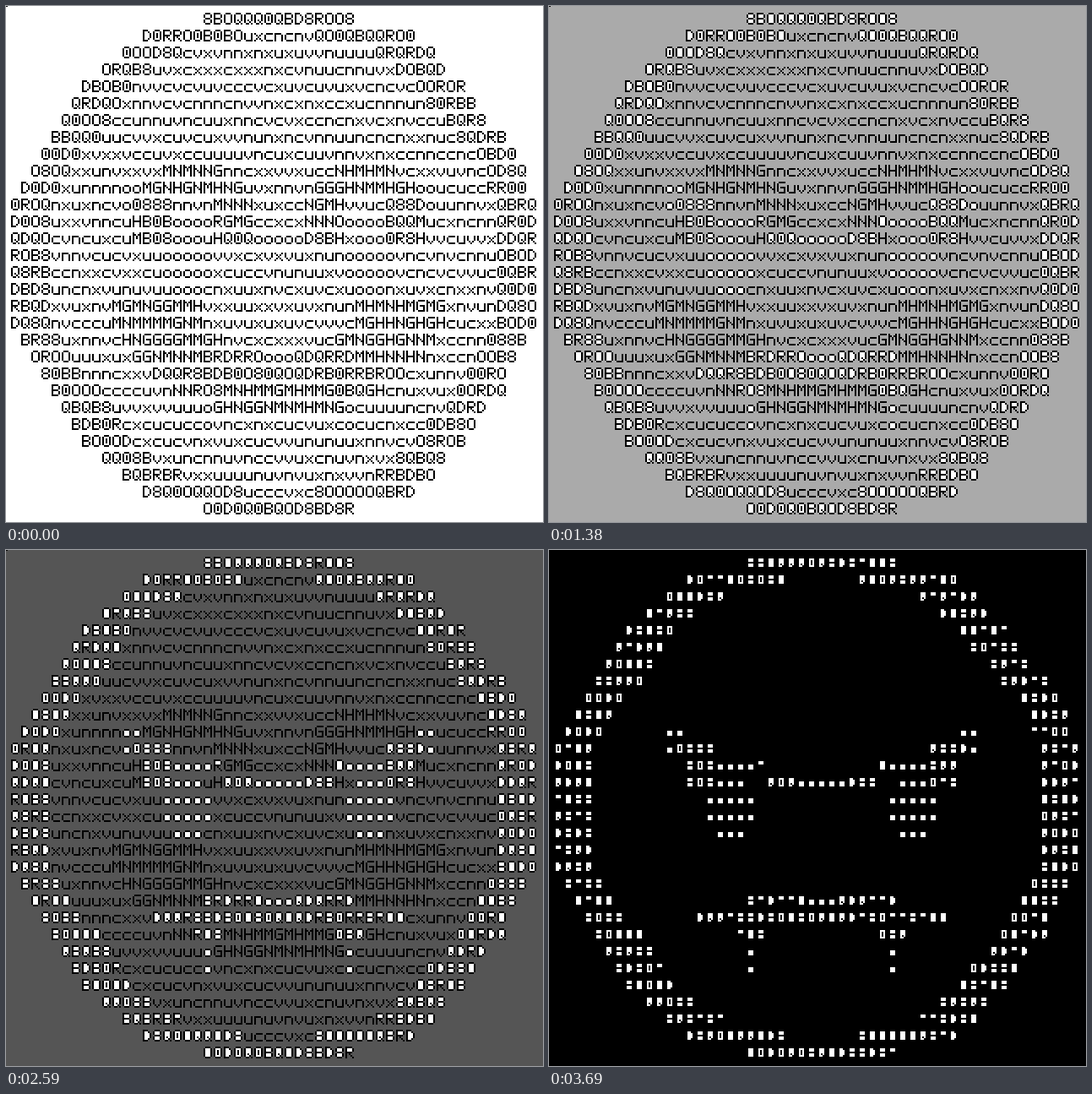
Write an HTML page with a canvas that moves like this. It is 636x611 px and loops after 8000 ms.

```html
<!DOCTYPE html>
<html lang="en">
<head>
<meta charset="utf-8">
<title>Fading text face</title>
<style>
  html, body { margin: 0; width: 100%; height: 100%; overflow: hidden; background: #fff; }
  canvas { display: block; width: 636px; height: 611px; background: #fff; }
</style>
</head>
<body>
<canvas id="stage" width="636" height="611" role="img" aria-label="A face made of letters"></canvas>
<script>
const LOOP = 8000;
const FADE = [500, 830, 1160, 1380, 1710, 1930, 2260, 2590, 2810, 3140, 3360, 3690];
const DOT = 2, CELL_W = 12, CELL_H = 20, LEFT = 6, TOP = 8;

// '#' is ink, '+' is an enclosed gap that stays white
const FONT = {
  '0': '.###. #+++# #+#+# #+#+# #+#+# #+++# .###.',
  '8': '.###. #+++# #+++# .###. #+++# #+++# .###.',
  B: '####. #+++# #+++# ####. #+++# #+++# ####.',
  D: '###.. #++#. #+++# #+++# #+++# #++#. ###..',
  O: '.###. #+++# #+++# #+++# #+++# #+++# .###.',
  Q: '.###. #+++# #+++# #+++# #+#+# #++#. .##.#',
  R: '####. #+++# #+++# ####. #.#.. #..#. #...#',
  M: '#...# ##.## #.#.# #.#.# #...# #...# #...#',
  N: '#...# #...# ##..# #.#.# #..## #...# #...#',
  G: '.#### #.... #.... #.### #...# #...# .####',
  H: '#...# #...# #...# ##### #...# #...# #...#',
  o: '.###. #+++# #+++# #+++# .###.',
  c: '.#### #.... #.... #.... .####',
  n: '####. #...# #...# #...# #...#',
  u: '#...# #...# #...# #...# .####',
  v: '#...# #...# #...# .#.#. ..#..',
  x: '#...# .#.#. ..#.. .#.#. #...#'
};

// start column, text
const ROWS = [
  [19, '8BOQQQ0QBD8ROO8'],
  [13, 'D0RRO0B0BOuxcncnvQO0QBQQRO0'],
  [11, '0OOD8QcvxvnnxnxuxuvvnuuuuQRQRDQ'],
  [9, 'ORQB8uvxcxxxcxxxnxcvnuucnnuvxDOBQD'],
  [7, 'DBOB0nvvcvcvuvcccvcxuvcuvuxvcncvcOOROR'],
  [6, 'QRDQOxnnvcvcnnncnvvnxcxnxccxucnnnun80RBB'],
  [5, 'Q0OO8ccunnuvncuuxnncvcvxccncnxvcxnvccuBQR8'],
  [4, 'BBQQ0uucvvxcuvcuxvvnunxncvnnuuncncnxxnuc8QDRB'],
  [3, '00D0xvxxvccuvxccuuuuvncuxcuuvnnvxnxccnnccncOBD0'],
  [2, 'O8OQxxunvxxvxMNMNNGnncxxvvxuccNHMHMNvcxxvuvncOD8Q'],
  [1, 'D0D0xunnnnooMGNHGNMHNGuvxnnvnGGGHNMMHGHooucuccRR00'],
  [0, '0ROQnxuxncvo0888nnvnMNNNxuxccNGMHvvucQ88DouunnvxQBRQ'],
  [0, 'D0O8uxxvnncuHB0BooooRGMGccxcxNNNOooooBQQMucxncnnQR0D'],
  [0, 'QDQOcvncuxcuMB08ooouHQ0QoooooD8BHxooo0R8HvvcuvvxDDQR'],
  [0, 'ROB8vnnvcucvxuuooooovvxcxvxvuxnunooooovncvnvcnnuOBOD'],
  [0, 'Q8RBccnxxcvxxcuoooooxcuccvnunuuxvooooovcncvcvvuc0QBR'],
  [0, 'DBD8uncnxvunuvuuooocnxuuxnvcxuvcxuooonxuvxcnxxnvQ0D0'],
  [0, 'RBQDxvuxnvMGMNGGMMHvxxuuxxvxuvxnunMHMNHMGMGxnvunDQ8O'],
  [0, 'DQ8QnvcccuMNMMMMGNMnxuvuxuxuvcvvvcMGHHNGHGHcucxxBOD0'],
  [1, 'BR88uxnnvcHNGGGGMMGHnvcxcxxxvucGMNGGHGNNMxccnn088B'],
  [2, 'OROOuuuxuxGGNMNNMBRDRROoooQDQRRDMMHNNHNnxccnOOB8'],
  [3, '80BBnnncxxvDQQR8BDB0O80QOQDRB0RRBROOcxunnv00RO'],
  [4, 'B0OOOccccuvnNNRO8MNHMMGMHMMG0BQGHcnuxvux0ORDQ'],
  [5, 'QBQB8uvvxvvuuuoGHNGGNMNMHMNGocuuuuncnvQDRD'],
  [6, 'BDB0Rcxcucuccovncxnxcucvuxcocucnxcc0DB8O'],
  [7, 'BO0ODcxcucvnxvuxcucvvununuuxnnvcvO8ROB'],
  [9, 'QQ08Bvxuncnnuvnccvvuxcnuvnxvx8QBQ8'],
  [11, 'BQBRBRvxxuuuunuvnvuxnxvvnRRBDBO'],
  [13, 'D8Q0OQQOD8ucccvxc8OOOOOQBRD'],
  [19, 'O0D0Q0BQOD8BD8R']
];

const stage = document.getElementById('stage');
const ctx = stage.getContext('2d');

function drawGlyph(char, x, y) {
  const lines = FONT[char].split(' ');
  const drop = 7 - lines.length;
  lines.forEach((line, r) => [...line].forEach((mark, c) => {
    if (mark === '.') return;
    ctx.fillStyle = mark === '#' ? '#000' : '#fff';
    ctx.fillRect(x + c * DOT, y + (r + drop) * DOT, DOT, DOT);
  }));
}

ROWS.forEach(([col, text], row) => [...text].forEach((char, i) =>
  drawGlyph(char, LEFT + (col + i) * CELL_W, TOP + row * CELL_H)));
ctx.fillStyle = '#000';
ctx.fillRect(0, 0, 2, 1);

// Only the backdrop changes; ink and white gaps stay put
const start = performance.now();
function frame(now) {
  const t = Math.max(0, now - start) % LOOP;
  const step = FADE.filter(at => at <= t).length;
  const grey = Math.floor(255 * (1 - step / FADE.length));
  stage.style.background = `rgb(${grey}, ${grey}, ${grey})`;
  requestAnimationFrame(frame);
}
requestAnimationFrame(frame);
</script>
</body>
</html>
```
